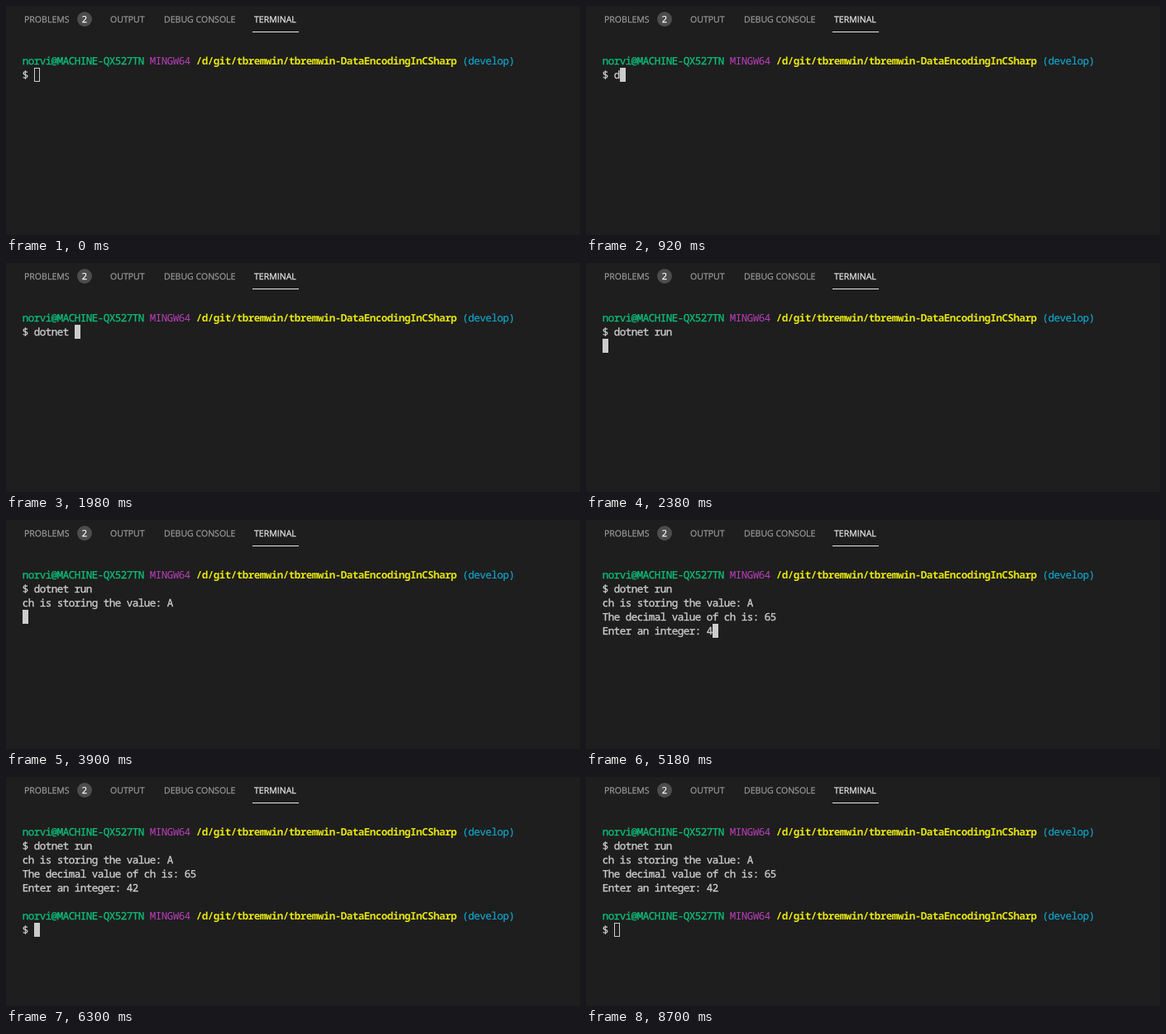
An HTML page for the animation above (8.77 s loop, 694x278 px).

```html
<!DOCTYPE html>
<html lang="en">
<head>
<meta charset="utf-8">
<title>Terminal session</title>
<style>
  html, body { margin: 0; width: 100%; height: 100%; overflow: hidden; background: #1e1e1e; }
  svg { display: block; width: 694px; height: 278px; }
  text {
    white-space: pre; text-rendering: geometricPrecision;
    fill: currentColor; stroke: currentColor; stroke-width: 0.25px;
  }
  .tabs { font: 10.55px "Open Sans", "Noto Sans", sans-serif; color: #979797; }
  .tabs .active { color: #e7e7e7; }
  .tabs .count { font-size: 11px; color: #fff; text-anchor: middle; }
  /* 0.6em advance, tightened to the 7px cell */
  #screen {
    font: 12.5px "Noto Sans Mono", "DejaVu Sans Mono", monospace;
    letter-spacing: -0.5px; font-variant-ligatures: none; color: #ccc;
  }
  #screen text { stroke-width: 0.35px; }
  #screen .user { color: #0dbc79; }
  #screen .system { color: #bc3fbc; stroke: none; }
  #screen .path { color: #e5e510; font-weight: 600; stroke: none; }
  #screen .branch { color: #11a8cd; stroke-width: 0.15px; }
</style>
</head>
<body>
<svg viewBox="0 0 694 278">
  <g class="tabs">
    <text x="22" y="20">PROBLEMS</text>
    <circle cx="95" cy="16" r="9" fill="#4d4d4d"/>
    <text class="count" x="95" y="20">2</text>
    <text x="126" y="20">OUTPUT</text>
    <text x="191" y="20">DEBUG CONSOLE</text>
    <text class="active" x="300" y="20">TERMINAL</text>
    <rect x="298" y="31" width="56" height="1" fill="#e7e7e7"/>
  </g>
  <g id="screen"></g>
  <rect id="cursor" width="6" height="16" stroke="#ccc"/>
</svg>
<script>
const LOOP = 8770, LEFT = 20, TOP = 58, CELL = 7, ROW = 17;
const FOCUS = 460, BLUR = 8700;

const promptParts = [
  ["user", "norvi@MACHINE-QX527TN"],
  ["system", "MINGW64"],
  ["path", "/d/git/tbremwin/tbremwin-DataEncodingInCSharp"],
  ["branch", "(develop)"],
];
const prompt = promptParts.map(part => part[1]).join(" ");

// Text appended to the terminal at each time (ms)
const output = [
  [0, prompt + "\n$ "],
  [920, "d"], [1250, "o"], [1380, "t"],
  [1650, "n"], [1780, "e"], [1850, "t"], [1980, " "],
  [2050, "r"], [2120, "u"], [2180, "n"], [2380, "\n"],
  [3900, "ch is storing the value: A\n"],
  [3970, "The decimal value of ch is: 65\nEnter an integer: "],
  [5180, "4"], [5510, "2"], [6170, "\n"],
  [6300, "\n" + prompt + "\n$ "],
];

const screen = document.getElementById("screen");
const cursor = document.getElementById("cursor");
let shown;

function addText(content, column, row, style = "") {
  const node = document.createElementNS("http://www.w3.org/2000/svg", "text");
  node.setAttribute("x", LEFT + column * CELL - 0.25);
  node.setAttribute("y", TOP + row * ROW + 13);
  node.setAttribute("class", style);
  node.textContent = content;
  screen.append(node);
}

function addPrompt(row) {
  let column = 0;
  for (const [style, content] of promptParts) {
    addText(content, column, row, style);
    column += content.length + 1;
  }
}

function draw(time) {
  const content = output.filter(([at]) => at <= time).map(([, added]) => added).join("");
  const lines = content.split("\n");
  if (content !== shown) {
    screen.replaceChildren();
    lines.forEach((line, row) => line === prompt ? addPrompt(row) : addText(line, 0, row));
    shown = content;
  }
  const focused = time >= FOCUS && time < BLUR;
  cursor.setAttribute("x", LEFT + lines.at(-1).length * CELL + 0.5);
  cursor.setAttribute("y", TOP + (lines.length - 1) * ROW + 0.5);
  cursor.setAttribute("fill", focused ? "#ccc" : "none");
}

const start = performance.now();
function tick() {
  draw((performance.now() - start) % LOOP);
  requestAnimationFrame(tick);
}
tick();
</script>
</body>
</html>
```
